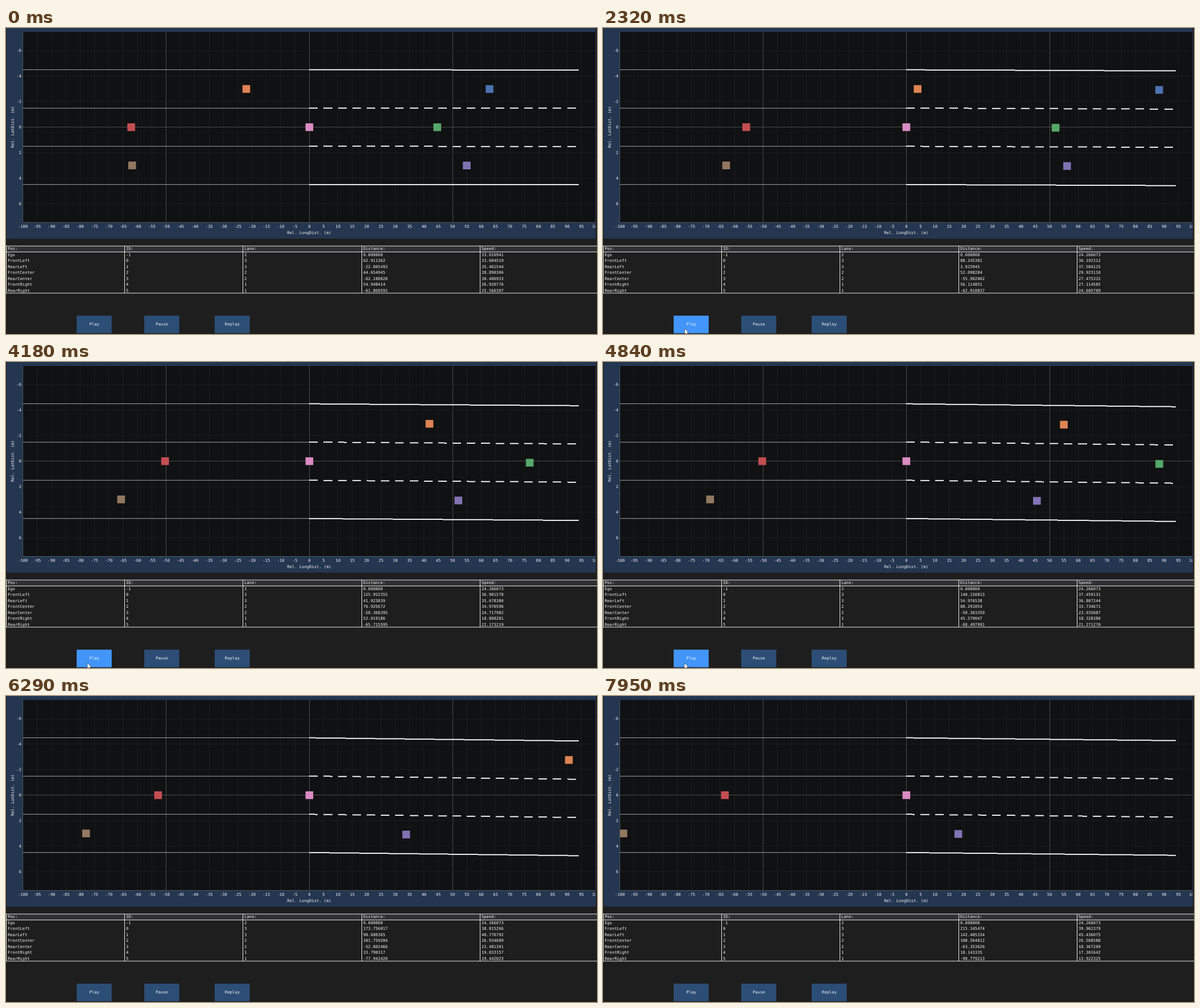
An HTML page with a canvas for the animation above (8 s loop, 1039 by 539 pixels).

```html
<!DOCTYPE html>
<html lang="en">
<head>
<meta charset="utf-8">
<title>Lane view</title>
<style>
html, body { margin: 0; width: 100%; height: 100%; overflow: hidden; background: #1e1e1e; }
canvas { display: block; }
</style>
</head>
<body>
<canvas id="stage" width="1039" height="539"></canvas>
<script>
const ctx = document.getElementById('stage').getContext('2d');
const LOOP = 8000, START = 660, STEP = 66.27, DT = 0.11, LAST = 110;
const PLOT = { l: 30, t: 7, r: 1036, b: 342 };
const PIXEL = 0.615; // size of one screen pixel on this scaled-down stage
const ROAD_LENGTH = 94;
const GRID = '#1b1c1e', AXIS = '#4b4c4d', BORDER = '#4d5663', LINE = '#e8e8e8';

// Each car passes through a few distances and sets off at its own speed
const TICKS = [-1, 11, 38, 72, 98, LAST];
const CARS = [
  { name: 'FrontLeft', lane: 3, color: '#4c72b0', speed: 33.604519,
    path: [62.911362, 72.172379, 105.695847, 153.488525, 195.000671, 215.345474] },
  { name: 'RearLeft', lane: 3, color: '#dd8452', speed: 35.461544,
    path: [-22.005493, -13.499994, 22.847361, 68.368431, 115.902298, 142.405334] },
  { name: 'FrontCenter', lane: 2, color: '#55a868', speed: 28.890306,
    path: [44.654945, 45.781071, 61.380989, 96.063957, 105.238655, 108.564812] },
  { name: 'RearCenter', lane: 2, color: '#c44e52', speed: 30.406933,
    path: [-62.188828, -60.216969, -52.102751, -50.974091, -56.791496, -63.353626] },
  { name: 'FrontRight', lane: 1, color: '#8172b3', speed: 26.920776,
    path: [54.948414, 53.217232, 58.100266, 40.158089, 26.628693, 18.143335] },
  { name: 'RearRight', lane: 1, color: '#937860', speed: 25.566397,
    path: [-61.868591, -63.023514, -63.165043, -71.926155, -86.759308, -98.779213] }
];

const px = m => 533.3 + 5.036 * m;
const py = m => 174.7 + 22.45 * m;
const snap = y => (Math.floor(y / PIXEL) + 0.5) * PIXEL;
const clamp01 = x => Math.max(0, Math.min(1, x));
const mix = (a, b, s) => a + (b - a) * s;
const smooth = x => { const s = clamp01(x); return s * s * (3 - 2 * s); };
const egoSpeed = k => mix(33.010941, 24.266073, clamp01((k + 1) / 8));

// The road bends as soon as the cars move, bends more, then relaxes a little
const roadBend = k => 0.0005 + 0.0034 * smooth((k + 1) / 12) +
  0.0086 * smooth((k - 40) / 32) - 0.0022 * clamp01((k - 72) / 38);

function rect(x, y, w, h, color) {
  ctx.fillStyle = color;
  ctx.fillRect(x, y, w, h);
}

function text(str, x, y, align = 'left') {
  ctx.textAlign = align;
  ctx.fillStyle = '#f4f4f4';
  ctx.fillText(str, x, y + 0.3);
}

function clipped(x, y, w, h, paint) {
  ctx.save();
  ctx.beginPath();
  ctx.rect(x, y, w, h);
  ctx.clip();
  paint();
  ctx.restore();
}

const secant = (path, j) => (path[j + 1] - path[j]) / (TICKS[j + 1] - TICKS[j]);

// Distance gained per tick at point j of a car's path
function slope(car, j) {
  if (j === 0) return (car.speed - egoSpeed(TICKS[0])) * DT;
  if (j === TICKS.length - 1) return 2 * secant(car.path, j - 1) - slope(car, j - 1);
  const s = (TICKS[j] - TICKS[j - 1]) / (TICKS[j + 1] - TICKS[j - 1]);
  return mix(secant(car.path, j - 1), secant(car.path, j), s);
}

function carState(car, k) {
  let j = 0;
  while (j < TICKS.length - 2 && k >= TICKS[j + 1]) j++;
  const span = TICKS[j + 1] - TICKS[j];
  const s = (k - TICKS[j]) / span, s2 = s * s, s3 = s2 * s;
  const ma = slope(car, j), mb = slope(car, j + 1);
  const dist = mix(car.path[j], car.path[j + 1], 3 * s2 - 2 * s3) +
    span * (ma * (s3 - 2 * s2 + s) + mb * (s3 - s2));
  const rate = secant(car.path, j) * 6 * (s - s2) +
    ma * (3 * s2 - 4 * s + 1) + mb * (3 * s2 - 2 * s);
  return { dist, speed: rate / DT + egoSpeed(k) };
}

function drawAxes() {
  const { l, t, r, b } = PLOT;
  rect(1, 0, 1036, 371, '#243650');
  rect(l, t, r - l, b - t, '#101113');
  for (let m = -95; m < 100; m += 5) {
    rect(Math.floor(px(m)), t, 1, b - t, m % 50 ? GRID : AXIS);
  }
  for (let m = -6; m <= 6; m += 2) {
    rect(l, Math.floor(py(m)), r - l, 1, m ? GRID : AXIS);
    text(String(m), 27, py(m), 'right');
  }
  rect(l - 1, t, 1, b - t, BORDER);
  rect(l - 1, b, r - l + 1, 1, BORDER);
  clipped(0, 0, r, 371, () => {
    for (let m = -100; m <= 100; m += 5) text(String(m), px(m), 350, 'center');
  });
  text('Rel. LongDist. (m)', 533, 361, 'center');
  ctx.save();
  ctx.translate(11.5, 174.5);
  ctx.rotate(-Math.PI / 2);
  text('Rel. LatDist. (m)', 0, 0, 'center');
  ctx.restore();
}

// A bent stroke that climbs down in whole screen pixels, without smoothing
function drawStroke(from, to, y, bend) {
  const end = Math.round(px(to));
  for (let x = Math.round(px(from)); x < end; x++) {
    rect(x, snap(y + bend * (x - px(0))) - 1.5 * PIXEL, 1, 3 * PIXEL, '#fff');
  }
}

function drawRoad(bend) {
  for (const m of [-4.5, -1.5, 1.5, 4.5]) {
    const y = py(m), solid = Math.abs(m) > 4;
    rect(PLOT.l, snap(y) - PIXEL / 2, 503, PIXEL, '#fff');
    if (solid) drawStroke(0, ROAD_LENGTH, y, bend);
    else for (let a = 0; a + 3 < ROAD_LENGTH; a += 5) drawStroke(a, a + 3, y, bend);
  }
}

function drawCar(dist, lane, bend, color) {
  const x = px(dist);
  const y = py((2 - lane) * 3) + bend * Math.max(0, x - px(0));
  rect(x - 6.8, y - 6.8, 13.6, 13.6, color);
}

function drawTable(rows) {
  rect(1, 384, 1038, 10, '#303033');
  for (const y of [383.5, 394, 466.5]) rect(0, y, 1039, 1, LINE);
  for (let c = 0; c < 5; c++) {
    const x = Math.round(c * 208.2);
    rect(x, 383.5, 1, 83.5, LINE);
    rows.forEach((row, r) => text(row[c], x + 3, 389 + r * 10.5));
  }
}

function drawButtons(t) {
  const idle = '#2c4e76', pressed = t >= 520 && t < START;
  const hover = t >= 390 && t < 5829;
  const button = (label, x, color) => {
    rect(x, 506.7, 61.6, 31, color);
    text(label, x + 31, 522.3, 'center');
  };
  button('Play', 124.2, pressed ? '#0f87fa' : hover ? '#4296fa' : idle);
  button('Pause', 243, idle);
  button('Replay', 366.8, idle);
}

function drawCursor(t) {
  if (t < 390 || t >= 5740) return;
  const enter = clamp01((t - 390) / 130);
  const drift = clamp01((t - 1560) / 800);
  const leave = clamp01((t - 5560) / 180);
  const x = mix(mix(150, 153, enter), 143, drift);
  const y = mix(mix(524, 516, enter), 530, drift) + 10 * leave;
  ctx.save();
  ctx.translate(x, y);
  const arrow = new Path2D('M0 0V10.2L2.3 8.1L4 11.8L5.7 11L4.1 7.4L7.2 7.2Z');
  ctx.fillStyle = '#fff';
  ctx.fill(arrow);
  ctx.strokeStyle = '#222';
  ctx.lineWidth = 0.6;
  ctx.stroke(arrow);
  ctx.restore();
}

function draw(t) {
  const k = t < START ? -1 : Math.min(LAST, Math.floor((t - START) / STEP + 0.1));
  const bend = roadBend(k);
  const states = CARS.map(car => carState(car, k));

  rect(0, 0, 1039, 539, '#1e1e1e');
  ctx.font = '7.16px "DejaVu Sans Mono", monospace';
  ctx.textBaseline = 'middle';
  ctx.textRendering = 'geometricPrecision';

  drawAxes();
  clipped(PLOT.l, PLOT.t, PLOT.r - PLOT.l, PLOT.b - PLOT.t, () => {
    drawRoad(bend);
    CARS.forEach((car, n) => drawCar(states[n].dist, car.lane, bend, car.color));
    drawCar(0, 2, bend, '#da8bc3');
  });
  drawTable([
    ['Pos:', 'ID:', 'Lane:', 'Distance:', 'Speed:'],
    ['Ego', '-1', '2', '0.000000', egoSpeed(k).toFixed(6)],
    ...CARS.map((car, n) => [car.name, String(n), String(car.lane),
      states[n].dist.toFixed(6), states[n].speed.toFixed(6)])
  ]);
  drawButtons(t);
  drawCursor(t);
}

const origin = performance.now();
function loop() {
  draw((performance.now() - origin) % LOOP);
  requestAnimationFrame(loop);
}
loop();
</script>
</body>
</html>
```
